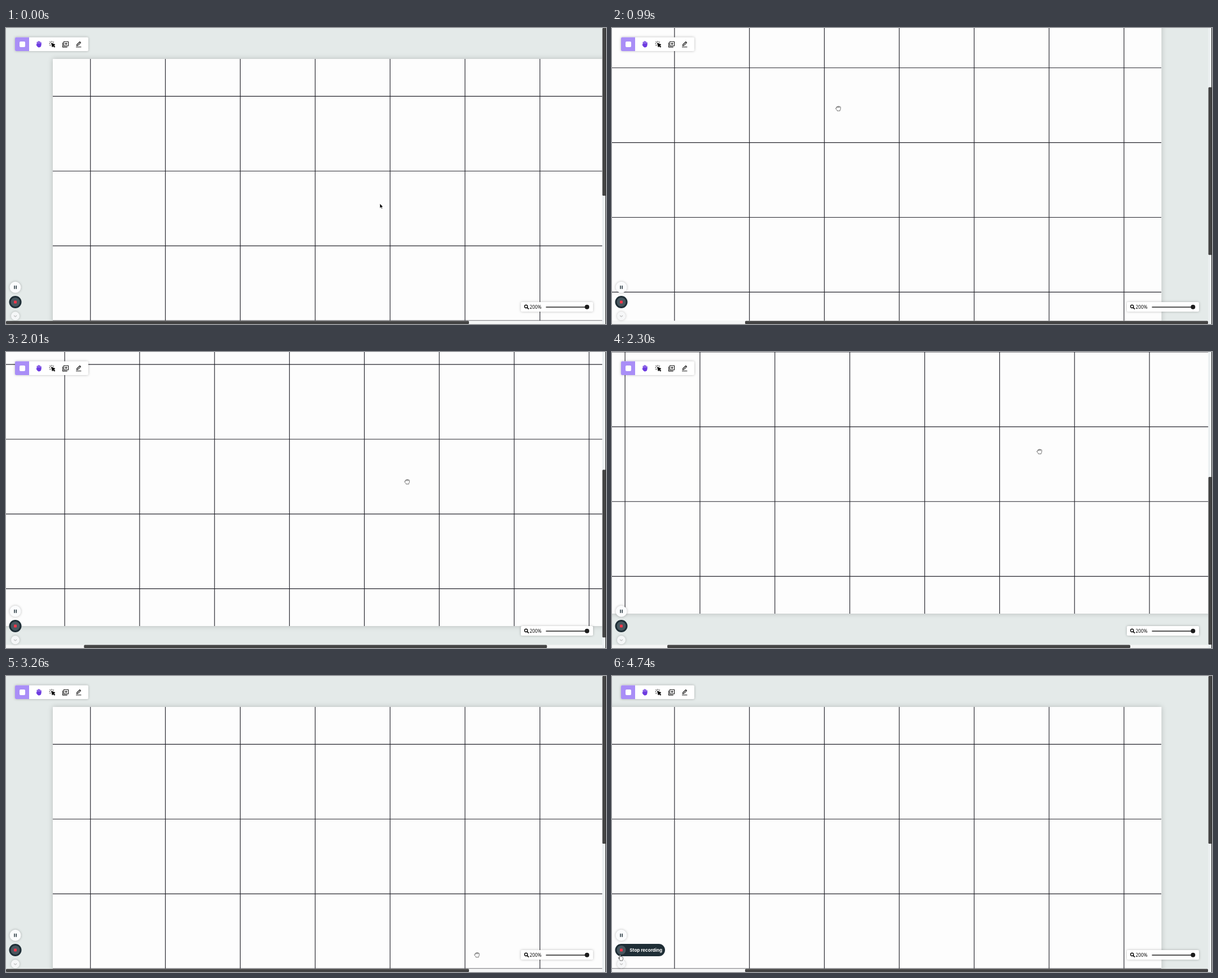
Write an HTML page that moves like this. It is 1064 px wide and 526 px high and loops after 4.76 s.

```html
<!DOCTYPE html>
<html lang="en">
<head>
<meta charset="utf-8">
<title>Canvas panning</title>
<style>
  html, body { margin: 0; width: 100%; height: 100%; overflow: hidden; background: #e4eae9; }
  svg { position: absolute; left: 0; top: 0; display: block; }
  .shadow { filter: drop-shadow(0 0 2px #0004); }
  .zoom { font: 8.4px "Noto Sans", sans-serif; fill: #111; }
  .stop { font: 700 8px Inter, sans-serif; fill: #fff; }
  .ink { fill: none; stroke: #111; stroke-width: 1.1; stroke-linecap: round; stroke-linejoin: round; }
  .hand { fill: #fff; stroke: #333; stroke-width: .7; stroke-linejoin: round; stroke-linecap: round; }
</style>
</head>
<body>
<svg width="1064" height="526" viewBox="0 0 1064 526">
  <defs>
    <clipPath id="view"><path d="M0 0H1057.5V520.5H0z"/></clipPath>
    <clipPath id="pillClip"><rect id="pill" x="5.5" y="476" height="22" rx="11"/></clipPath>
  </defs>

  <g clip-path="url(#view)">
    <g id="page">
      <rect width="1196" height="797" fill="#fdfdfd" style="filter:drop-shadow(0 0 5px #0003)"/>
      <path id="grid" fill="none" stroke="#24242c" stroke-width="1.15"/>
    </g>
  </g>

  <path d="M0 520.5H1057.5V526H0z" fill="#f5f6f6"/>
  <path d="M1057.5 0H1063V526H1057.5z" fill="#edf1f3"/>
  <path d="M1063 0H1064V526H1063z" fill="#1c1c1c"/>
  <rect id="barX" y="520.6" width="821" height="5.4" rx="1.5" fill="#444"/>
  <rect id="barY" x="1057.6" width="5.9" height="298" rx="1.5" fill="#444"/>

  <rect class="shadow" x="16" y="16.5" width="130" height="24.5" rx="2" fill="#fff"/>
  <path d="M18 16.5H41V41H18a2 2 0 0 1-2-2V18.5a2 2 0 0 1 2-2z" fill="#a98ef7"/>
  <rect x="24" y="24" width="10" height="10" rx="2" fill="#fff"/>

  <g fill="none" stroke="#6d3be0" stroke-linecap="round" stroke-linejoin="round">
    <path d="M55.5 29V25.3M57.6 28V23.8M59.7 28V24.3M61.8 29V26" stroke-width="1.7"/>
    <path d="M55.3 28.5h6.7v2.5q-.3 3-3 3h-1.2q-1.2 0-2.2-1.5l-1.5-2.4z" fill="#6d3be0"/>
  </g>
  <path d="M80.5 26.8l6.5 2.8-2.5 1.2 2.3 2.5-1.2 1-2.2-2.5-1.2 2.2z" fill="#111" stroke="#111"/>
  <path class="ink" d="M77 27.8h1M78 24.6l.8.8M81.2 23.6v.8M84.3 24.8l-.6.6M78 31l.7-.7"/>
  <path class="ink" d="M102.5 24.2h8v7.6h-8zM100.5 26.2v7.7h7.8M106.5 26.2v3.6M104.7 28h3.6"/>
  <path class="ink" d="M124.5 33.8h8.5M125.3 31.5l.4-2 5.2-5 1.6 1.6-5.2 5z"/>

  <rect class="shadow" x="913" y="487" width="128" height="17" rx="2" fill="#fff"/>
  <circle cx="922.2" cy="494.8" r="2.6" fill="none" stroke="#111" stroke-width="1.5"/>
  <path d="M924.3 496.9l2.2 2.2" stroke="#111" stroke-width="1.8" stroke-linecap="round"/>
  <text class="zoom" x="928.4" y="499">200%</text>
  <path d="M957.5 496H1030" stroke="#1c1c1c" stroke-width="1.6"/>
  <circle cx="1030.3" cy="495.8" r="4" fill="#1c1c1c"/>

  <g class="shadow" fill="#fbfcfd">
    <circle cx="16.5" cy="460.7" r="10"/>
    <circle cx="16.5" cy="511.8" r="7.5" opacity=".9"/>
  </g>
  <path d="M15 457.8v6M18.2 457.8v6" stroke="#34444c" stroke-width="1.7"/>
  <path d="M14 511l2.5 2 2.5-2" fill="none" stroke="#999" stroke-width=".9"/>
  <g clip-path="url(#pillClip)">
    <path d="M5 476H95V498H5z" fill="#1f2e36"/>
    <text class="stop" x="31.3" y="490">Stop recording</text>
  </g>
  <circle cx="16.5" cy="487" r="8" fill="#48575f"/>
  <rect x="14" y="484.6" width="5" height="5" rx="1" fill="#f2364a"/>

  <path id="arrow" d="M0 0V8.2L1.9 6.5 3.2 9.2 4.5 8.6 3.2 6H5.7z" stroke="#fff" stroke-width=".6"/>
  <path id="fist" class="hand" d="M-2.9-2.3q.5-1.5 1.7-.8.5-1.3 1.7-.5 1-.9 1.8.4 1.5-.6 2 .8v2.5q-.2 2-1.1 2.9v1.2h-4.9V3.2q-2.3-1.9-2.7-3.2 0-1.2 1.5-.9zM-1.2-3.1v1.5M.5-3.6v2M2.3-3.2v1.6"/>
  <path id="pointer" class="hand" d="M-1.5 2.2V-3.8q.8-1.2 1.6 0v2.6q1-.7 1.6.2 1-.5 1.5.4 1.2-.2 1.3.8v2.3q-.2 1.6-1 2.4v1h-4.2v-1Q-2.5 3.2-3.9.9-3.8-.5-2.5.5z"/>
</svg>
<script>
const LOOP = 4760, CELL = 132.85, COLS = 9, ROWS = 6;
const MAX_X = 304.6, MAX_Y = 387.1;
const $ = id => document.getElementById(id);
const clamp = (v, lo, hi) => Math.min(hi, Math.max(lo, v));

// Cursor waypoints: time, x, y, and whether the hand drags on the way there
const path = [
  [200, 663, 312, 0],
  [310, 712, 326.5, 0],
  [990, 401, 143, 1],
  [1400, 585, 412, 0],
  [1790, 648, 287, 1],
  [2270, 763, 180, 1],
  [2300, 758, 177, 0],
  [2600, 645, 112.5, 0],
  [2970, 785, 307, 1],
  [3230, 830, 502, 1],
  [3470, 861, 360, 0],
  [3850, 571, 360, 1],
  [3950, 530, 360, 1],
  [4570, 15, 500, 0]
];

// Monotone cubic: smooth motion that never overshoots a waypoint
const rate = (i, c) => (path[i + 1][c] - path[i][c]) / (path[i + 1][0] - path[i][0]);
function slope(i, c) {
  if (i === 0 || i === path.length - 1) return 0;
  const a = rate(i - 1, c), b = rate(i, c);
  return a * b > 0 ? 2 * a * b / (a + b) : 0;
}
function between(i, u, c) {
  const p = path[i], q = path[i + 1], d = q[0] - p[0], v = 1 - u;
  return v * v * ((1 + 2 * u) * p[c] + u * d * slope(i, c))
       + u * u * ((1 + 2 * v) * q[c] - v * d * slope(i + 1, c));
}

// Follow the cursor; dragging scrolls the page against it, within its limits
function pose(t) {
  let x, y, sx = 0, sy = 0;
  for (let i = 0; i < path.length - 1; i++) {
    const [t0, x0, y0] = path[i], [t1, , , drag] = path[i + 1];
    const u = clamp((t - t0) / (t1 - t0), 0, 1);
    x = between(i, u, 1);
    y = between(i, u, 2);
    if (drag) {
      sx = clamp(sx + x0 - x, 0, MAX_X);
      sy = clamp(sy + y0 - y, 0, MAX_Y);
    }
    if (t < t1) break;
  }
  return { x, y, sx, sy };
}

let lines = "";
for (let i = 0; i < COLS; i++) lines += `M${(i + .5) * CELL + .3} 0V${ROWS * CELL}`;
for (let i = 0; i < ROWS; i++) lines += `M0 ${(i + .5) * CELL}H${COLS * CELL}`;
$("grid").setAttribute("d", lines);

const move = (id, x, y) => $(id).setAttribute("transform", `translate(${x} ${y})`);

function draw(now) {
  const t = now % LOOP, { x, y, sx, sy } = pose(t);
  move("page", 83 - sx, 55 - sy);
  $("barX").setAttribute("x", sx / MAX_X * 236);
  $("barY").setAttribute("y", sy / MAX_Y * 222);

  const cursor = t < 310 ? "arrow" : t < 4540 ? "fist" : "pointer";
  for (const id of ["arrow", "fist", "pointer"]) $(id).style.display = id === cursor ? "" : "none";
  move(cursor, x, y);

  const left = 1 - clamp((t - 4590) / 140, 0, 1);
  $("pill").setAttribute("width", 22 + 66.5 * (1 - left * left));
  requestAnimationFrame(draw);
}
draw(performance.now());
</script>
</body>
</html>
```
